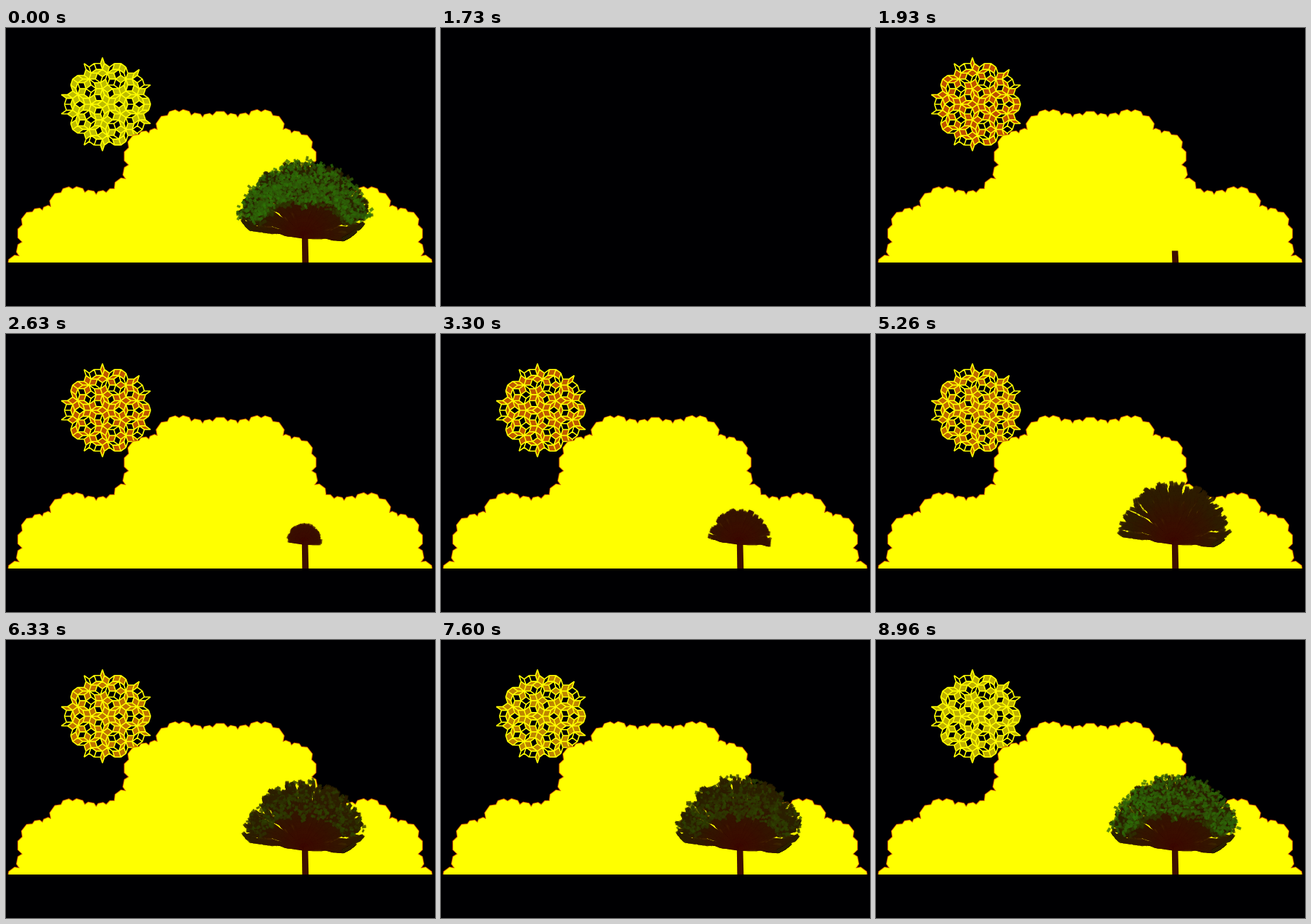
Animation of 600x390 px, one loop 9230 ms. Source, as an HTML page with a canvas:

```html
<!DOCTYPE html>
<html lang="en">
<head>
<meta charset="utf-8">
<title>Sun, cloud and growing tree</title>
<style>
html, body { margin: 0; width: 100%; height: 100%; overflow: hidden; background: #000; }
canvas { display: block; }
</style>
</head>
<body>
<canvas id="stage" width="600" height="390"></canvas>
<script>
const W = 600, H = 390, LOOP = 9230, CLEAR = 1730, GROUND = 329;
const ctx = document.getElementById('stage').getContext('2d');

// Moments at which the picture advances: steps slow down as the tree gets larger
const spread = (from, to, count) =>
  Array.from({ length: count }, (_, i) => from + (to - from) * i / (count - 1));
const times = [
  CLEAR, ...spread(1800, 2630, 22), ...spread(2660, 3560, 23), ...spread(3630, 4530, 16),
  ...spread(4630, 5360, 9), ...spread(5530, 6330, 6), ...spread(6660, 7600, 4),
  ...spread(8330, 8960, 3), LOOP
];
const LAST = times.length - 1;
const LEAFY = LAST - 3;   // first step with bright leaves

function stepAt(t) {
  if (t < CLEAR) return LAST;
  return times.filter(s => s <= t + 0.01).length - 1;
}

function seeded(seed) {
  return () => {
    seed = (seed + 0x6D2B79F5) | 0;
    let v = Math.imul(seed ^ (seed >>> 15), 1 | seed);
    v = (v + Math.imul(v ^ (v >>> 7), 61 | v)) ^ v;
    return ((v ^ (v >>> 14)) >>> 0) / 4294967296;
  };
}

function polygon(points) {
  const path = new Path2D();
  points.forEach((p, i) => i ? path.lineTo(...p) : path.moveTo(...p));
  path.closePath();
  return path;
}

// Sun: Penrose rhombs from an L-system
function makeSun(cx, cy, radius, depth) {
  const rules = {
    W: 'YF++ZF----XF[-YF----WF]++',
    X: '+YF--ZF[---WF--XF]+',
    Y: '-WF++XF[+++YF++ZF]-',
    Z: '--YF++++WF[+ZF++++XF]--XF',
    F: ''
  };
  let word = '[X]++[X]++[X]++[X]++[X]';
  for (let i = 0; i < depth; i++) word = [...word].map(c => rules[c] ?? c).join('');

  const edges = [], rhombs = new Map(), stack = [];
  const gap = (p, q) => Math.hypot(p.x - q.x, p.y - q.y);
  let pos = { x: 0, y: 0 }, dir = 0;
  for (const c of word) {
    if (c === '+') dir++;
    else if (c === '-') dir--;
    else if (c === '[') stack.push([pos, dir]);
    else if (c === 'F') {
      const a = dir * Math.PI / 5;
      const next = { x: pos.x + Math.cos(a), y: pos.y + Math.sin(a) };
      edges.push([pos, next]);
      pos = next;
    } else if (c === ']') {
      const side = edges.slice(-4);
      const closed = side.length === 4 &&
        side.every((e, i) => gap(e[1], side[(i + 1) % 4][0]) < 0.01);
      if (closed) {
        const [p, , q] = side.map(e => e[0]);
        const key = [p.x + q.x, p.y + q.y].map(v => Math.round(v * 20)).join();
        const across = gap(p, q);
        rhombs.set(key, { corners: side.map(e => e[0]), thick: across > 1 && across < 1.8 });
      }
      [pos, dir] = stack.pop();
    }
  }

  const tip = edges.map(e => e[1]).reduce((m, p) =>
    Math.hypot(p.x, p.y) > Math.hypot(m.x, m.y) ? p : m);
  const flip = Math.cos(5 * Math.atan2(tip.y, tip.x)) > 0 ? -1 : 1;
  const scale = flip * radius / Math.hypot(tip.x, tip.y);
  const at = p => [cx + p.x * scale, cy + p.y * scale];
  const lines = new Path2D(), rnd = seeded(5);
  for (const [p, q] of edges) {
    lines.moveTo(...at(p));
    lines.lineTo(...at(q));
  }
  // Some thin rhombs stay open
  const tiles = [...rhombs.values()]
    .filter(r => r.thick || rnd() > 0.35)
    .map(r => polygon(r.corners.map(at)));
  return { lines, tiles };
}

// Cloud: one scalloped dome, repeated along the sides of a pentagon
function makeCloud() {
  const mid = 299.5, shift = 184;
  const left = [
    [152, 224], [168, 212], [172, 192], [172, 168], [186, 150], [200, 148], [212, 143],
    [226, 123], [242, 118], [259, 123], [275, 126], [289, 123]
  ];
  const notches = left.concat(left.map(([x, y]) => [2 * mid - x, y]).reverse());
  const edge = [];
  notches.forEach(([x, y], i) => {
    edge.push([x, y]);
    if (i === notches.length - 1) return;
    const dx = notches[i + 1][0] - x, dy = notches[i + 1][1] - y;
    for (const f of [0.25, 0.75]) edge.push([x + f * dx + 0.26 * dy, y + f * dy - 0.26 * dx]);
  });
  edge.push([2 * mid - 152, H], [152, H]);
  const dx = shift * Math.cos(Math.PI / 5), dy = shift * Math.sin(Math.PI / 5);
  return [-1, 0, 1].map(s =>
    polygon(edge.map(([x, y]) => [x + s * dx, y + Math.abs(s) * dy])));
}

// Tree: strokes and leaves, each with the step at which it appears
const ROOT = { x: 417, y: 292 };
const crown = k => k < 9 ? 0 : k < 22 ? 27 * (k - 8) / 14 : 27 + 1.28 * (k - 22);
const limit = a => 110 - 120 * Math.max(0, Math.abs(a) - 1.22);
const clamp = (v, lo, hi) => Math.max(lo, Math.min(hi, v));

function inCrown(a, r) {
  r = Math.min(r, limit(a));
  return { x: ROOT.x + 0.92 * Math.sin(a) * r, y: ROOT.y - Math.cos(a) * r };
}

function makeTree() {
  const rnd = seeded(27), marks = [];
  const between = (lo, hi) => lo + rnd() * (hi - lo);
  const drift = () => between(-0.01, 0.01);
  let twigs = spread(-1.43, 1.62, 48).map(a =>
    ({ a, reach: between(0.86, 1.03), turn: drift(), p: ROOT }));

  for (let k = 9; k <= LAST; k++) {
    if (k === 36 || k === 58) {
      twigs = twigs.flatMap(t => [t, { ...t, turn: -t.turn, reach: between(0.82, 1.03) }]);
    }
    const bark = `rgb(${Math.round(64 - 0.26 * k)},${Math.round(8 + 0.3 * k)},0)`;
    for (const t of twigs) {
      if (rnd() < 0.15) t.turn = drift();
      t.a = clamp(t.a + t.turn, -1.45, 1.64);
      const q = inCrown(t.a, crown(k) * t.reach);
      const dx = q.x - t.p.x, dy = q.y - t.p.y, d = Math.hypot(dx, dy);
      if (d > 0.25) {
        marks.push({ k, color: bark, alpha: 0.7, x: q.x, y: q.y,
          turn: Math.atan2(dy, dx), len: d + 2, wide: 7.5 - k * 0.034 });
      }
      t.p = q;
    }

    const bright = k >= LEAFY;
    const leaves = k === LEAFY || k === LAST ? 520 : k > 70 && !bright ? 75 : 0;
    for (let i = 0; i < leaves; i++) {
      const a = between(-1.3, 1.3);
      const inner = 0.42 + 0.2 * Math.abs(a);
      const p = inCrown(a, crown(k) * Math.sqrt(between(inner * inner, 1)));
      const green = Math.round(bright ? between(75, 118) : between(42, 70));
      marks.push({ k, color: `rgb(45,${green},${bright ? 8 : 2})`, alpha: 0.75,
        x: p.x, y: p.y, turn: between(0, 6.28), len: between(3, 7), wide: between(2.5, 4.5) });
    }
  }
  return marks;
}

function drawTree(n) {
  const k = n > LEAFY && n < LAST ? LEAFY : n;
  const top = GROUND - 37 * Math.min(1, k / 9);
  ctx.fillStyle = '#3e0f00';
  ctx.fill(polygon([[414.3, GROUND], [413.8, top], [422.4, top], [423.3, GROUND]]));
  for (const m of tree) {
    if (m.k > k) break;
    ctx.save();
    ctx.translate(m.x, m.y);
    ctx.rotate(m.turn);
    ctx.globalAlpha = m.alpha;
    ctx.fillStyle = m.color;
    ctx.fillRect(-m.len, -m.wide / 2, m.len, m.wide);
    ctx.restore();
  }
}

const sun = makeSun(142, 107, 66, 4);
const cloud = makeCloud();
const tree = makeTree();

function draw(n) {
  ctx.fillStyle = '#000002';
  ctx.fillRect(0, 0, W, H);
  if (n === 0) return;

  // The sun warms from orange to yellow, fastest at the end
  const u = (times[n] - CLEAR) / (LOOP - CLEAR);
  ctx.fillStyle = `rgb(190,${Math.round(78 + 55 * u + 55 * u ** 6)},0)`;
  sun.tiles.forEach(tile => ctx.fill(tile));
  ctx.lineJoin = 'round';
  ctx.strokeStyle = '#ff0';
  ctx.lineWidth = 1.6;
  ctx.stroke(sun.lines);

  ctx.save();
  ctx.beginPath();
  ctx.rect(0, 0, W, GROUND);
  ctx.clip();
  ctx.strokeStyle = '#c85000';
  ctx.lineWidth = 2;
  cloud.forEach(dome => ctx.stroke(dome));
  ctx.fillStyle = '#ff0';
  cloud.forEach(dome => ctx.fill(dome));
  ctx.restore();

  drawTree(n);
}

const start = performance.now();
let shown = -1;
function tick() {
  const n = stepAt((performance.now() - start) % LOOP);
  if (n !== shown) draw(shown = n);
  requestAnimationFrame(tick);
}
tick();
</script>
</body>
</html>
```
